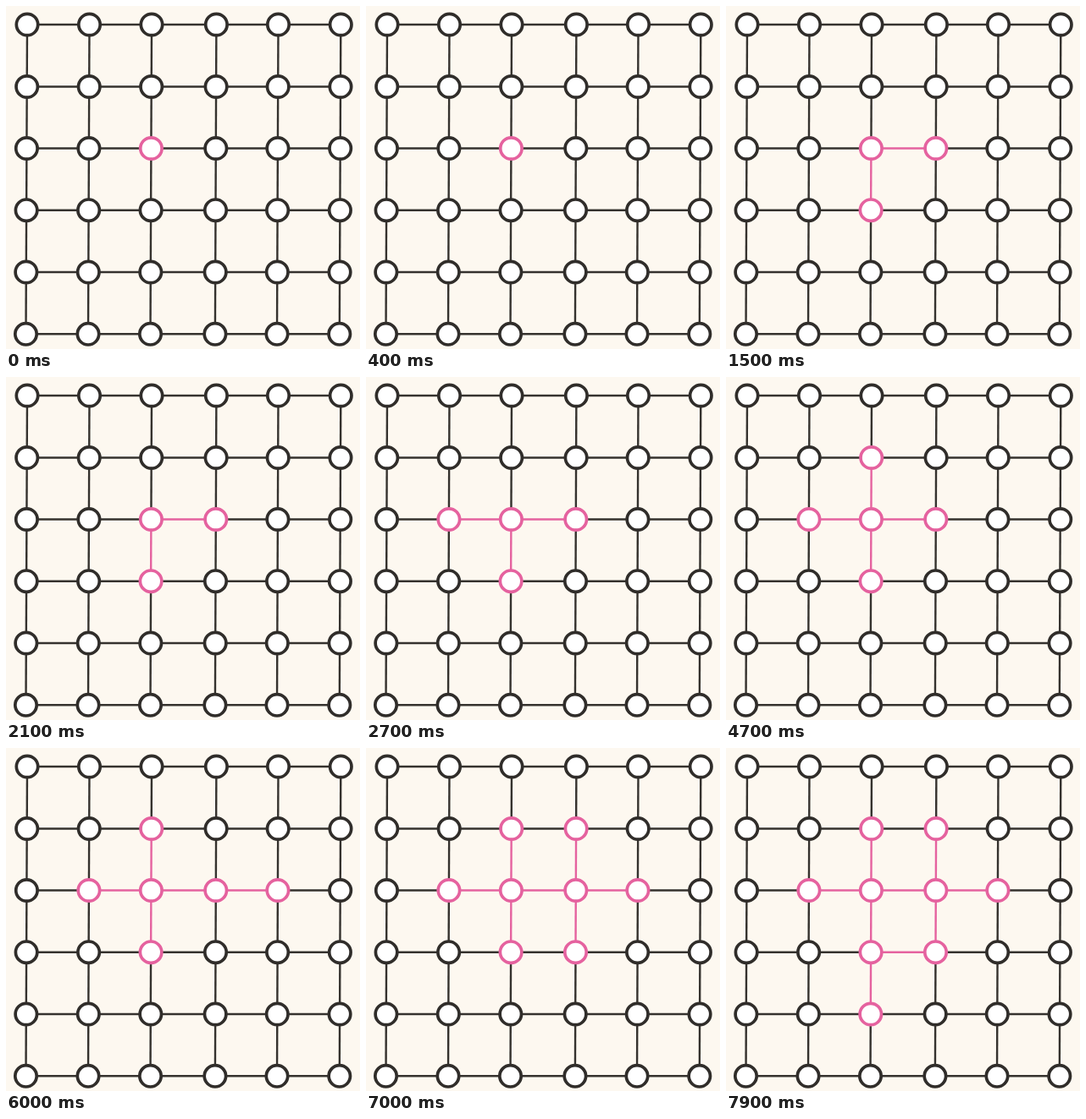
An HTML page for the animation above (8000 ms loop, 418 by 406 pixels).

```html
<!DOCTYPE html>
<html lang="en">
<head>
<meta charset="utf-8">
<title>Grid search</title>
<style>
  html, body { margin: 0; width: 100%; height: 100%; overflow: hidden; background: #fdf8f0; }
  svg { display: block; width: 100%; height: 100%; }
  line { stroke: #35322e; stroke-width: 2.4; }
  circle { stroke: #302d2a; stroke-width: 3.7; fill: #fff; }
</style>
</head>
<body>
<svg id="stage" viewBox="0 0 418 406"></svg>
<script>
const LOOP = 8000, PINK = '#e5629f';
const COLS = [25, 98.5, 172, 248.4, 321.5, 395.3];
const ROWS = [22, 95.5, 168.5, 241.7, 315, 388.3];

// Each step: time in ms, from [row, col], to [row, col]
const STEPS = [
  [1000, [2, 2], [2, 3]],
  [1500, [2, 2], [3, 2]],
  [2300, [2, 2], [2, 1]],
  [4700, [2, 2], [1, 2]],
  [6000, [2, 3], [2, 4]],
  [6400, [2, 3], [3, 3]],
  [7000, [2, 3], [1, 3]],
  [7500, [3, 2], [3, 3]],
  [7900, [3, 2], [4, 2]]
];

const stage = document.getElementById('stage');
const parts = {};

function add(tag, key, attrs) {
  const el = document.createElementNS('http://www.w3.org/2000/svg', tag);
  for (const name in attrs) el.setAttribute(name, attrs[name]);
  parts[key] = stage.appendChild(el);
}

// The grid leans slightly to the left towards the bottom
const point = ([r, c]) => [COLS[c] - 0.3 * r, ROWS[r]];
const edgeKey = (a, b) => [a.join(), b.join()].sort().join('-');

function addEdge(a, b) {
  const [x1, y1] = point(a), [x2, y2] = point(b);
  add('line', edgeKey(a, b), { x1, y1, x2, y2 });
}

function addNode(at) {
  const [cx, cy] = point(at);
  add('circle', at.join(), { cx, cy, r: 12.7 });
}

function light(key, time) {
  const el = parts[key], dark = getComputedStyle(el).stroke, offset = time / LOOP;
  el.animate([
    { stroke: dark, offset: 0 },
    { stroke: dark, offset },
    { stroke: PINK, offset },
    { stroke: PINK, offset: 1 }
  ], { duration: LOOP, iterations: Infinity });
}

const cells = ROWS.flatMap((_, r) => COLS.map((_, c) => [r, c]));
for (const [r, c] of cells) {
  if (c < 5) addEdge([r, c], [r, c + 1]);
  if (r < 5) addEdge([r, c], [r + 1, c]);
}
cells.forEach(addNode);

parts['2,2'].style.stroke = PINK;
const visited = new Set();
for (const [time, from, to] of STEPS) {
  light(edgeKey(from, to), time);
  const key = to.join();
  if (!visited.has(key)) light(key, time);
  visited.add(key);
}
</script>
</body>
</html>
```
